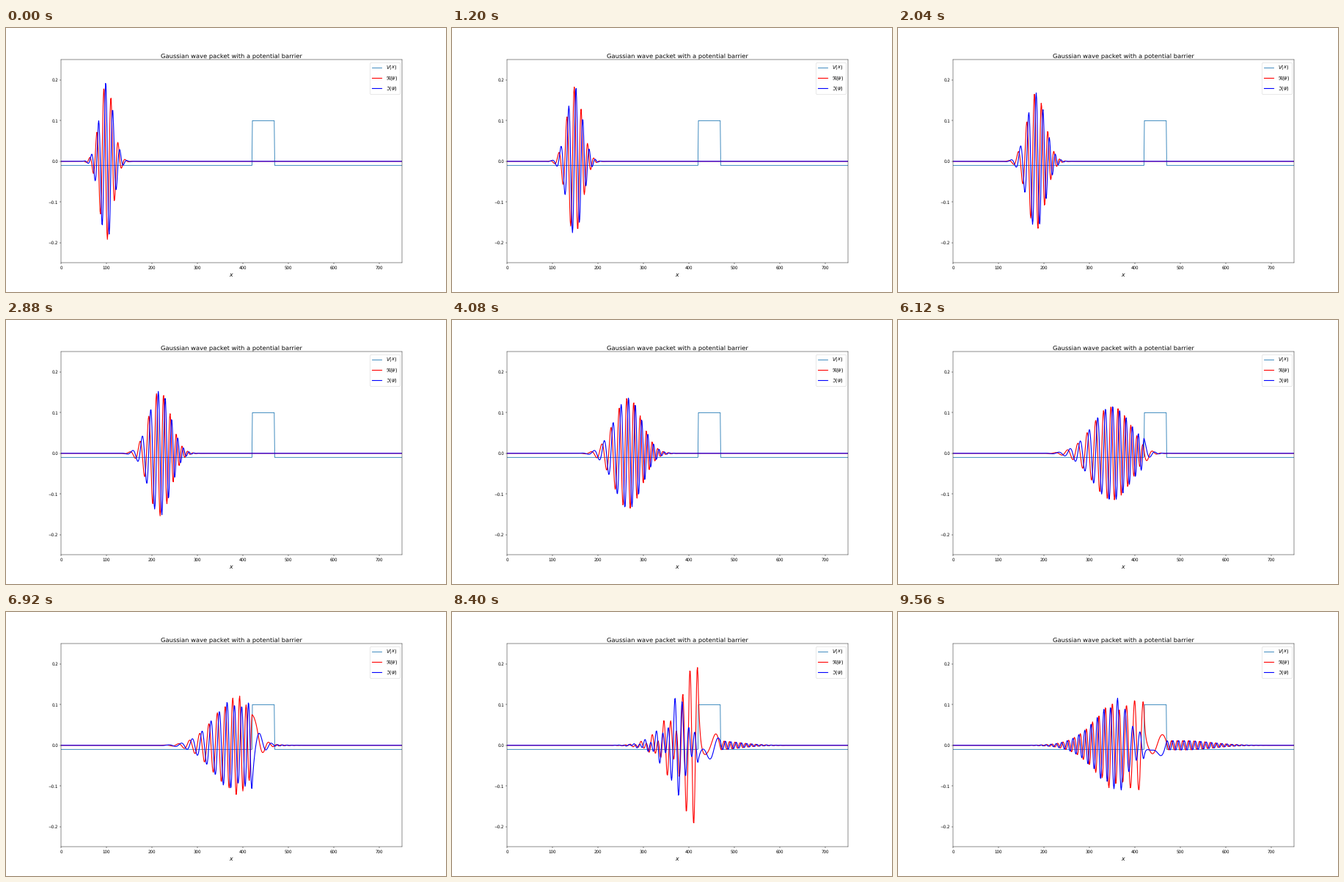
A matplotlib script for the animation above (9600 ms loop, 600 by 360 pixels).

```python
import matplotlib.pyplot as plt
import numpy as np
from matplotlib.animation import FuncAnimation

FRAMES, INTERVAL = 240, 40
LENGTH, T_END = 750, 1000
X0, SIGMA, K0 = 100, 15, 0.4

plt.rcParams.update({"font.family": "DejaVu Sans", "text.hinting": "none"})


def evolve(psi0, potential, times):
    """Exact evolution of psi0 on a unit grid (hbar = m = 1), one column per time."""
    hop = np.full(len(psi0) - 1, -0.5)
    hamiltonian = np.diag(1 + potential) + np.diag(hop, 1) + np.diag(hop, -1)
    energy, modes = np.linalg.eigh(hamiltonian)
    phases = np.exp(-1j * np.outer(energy, times))
    return modes @ (phases * (modes.T @ psi0)[:, None])


x = np.arange(LENGTH + 1.0)
barrier = np.where((x > 420) & (x < 470), 0.1, -0.01)
packet = np.exp(-(x - X0) ** 2 / (2 * SIGMA**2) + 1j * K0 * x)
packet /= (np.pi * SIGMA**2) ** 0.25
waves = evolve(packet, barrier, np.linspace(0, T_END, FRAMES))

fig, ax = plt.subplots(figsize=(15, 9), dpi=40)
ax.plot(x, barrier, color="tab:blue", lw=1.5, label="$V(x)$")
real_line, = ax.plot(x, packet.real, color="red", lw=2, label=r"$\Re(\psi)$")
imag_line, = ax.plot(x, packet.imag, color="blue", lw=2, label=r"$\Im(\psi)$")

ax.set_xlim(0, LENGTH)
ax.set_ylim(-0.25, 0.25)
ax.set_xticks(range(0, LENGTH, 100))
ax.set_yticks([-0.2, -0.1, 0, 0.1, 0.2])
ax.set_title("Gaussian wave packet with a potential barrier", fontsize=15)
ax.set_xlabel("$x$", fontsize=14)
ax.legend(loc="upper right", fontsize=12)


def update(frame):
    psi = waves[:, frame]
    real_line.set_ydata(psi.real)
    imag_line.set_ydata(psi.imag)
    return real_line, imag_line


anim = FuncAnimation(fig, update, frames=FRAMES, interval=INTERVAL,
                     repeat=True, repeat_delay=0)
plt.show()
```
